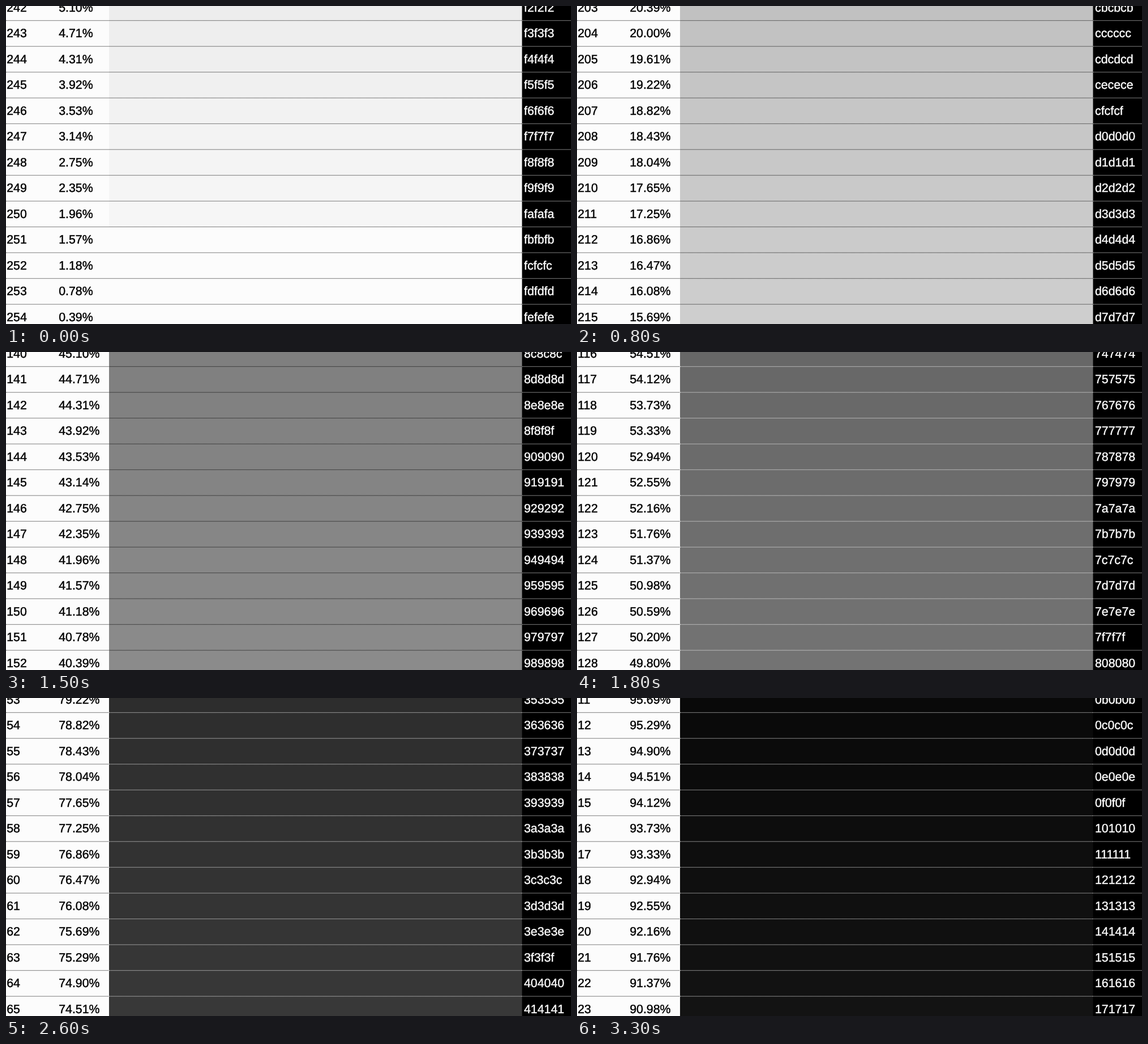
These frames come from a looping animation (998x561 px, 3.8 s). An HTML page:

```html
<!DOCTYPE html>
<html lang="en">
<head>
<meta charset="utf-8">
<title>Grey scale table</title>
<style>
  html, body { margin: 0; width: 100%; height: 100%; overflow: hidden; background: #fcfcfc; }
  svg { display: block; width: 998px; height: 561px; }
  text {
    font: 21.3px "Liberation Sans", Arial, Helvetica, sans-serif;
    text-rendering: geometricPrecision;
    white-space: pre;
    stroke-width: 0.45;
  }
  line { stroke-width: 1; stroke-dasharray: 1 1; }
</style>
</head>
<body>
<svg id="stage" viewBox="0 0 998 561">
  <rect width="998" height="561" fill="#fcfcfc"/>
</svg>
<script>
const LOOP = 3800, STEP = 100;
const PITCH = 45.5, FIRST_LINE = -19.9, ROWS = 13;
const BAR_X = 182, CODE_X = 911.5, WIDTH = 998;
const PAPER = "#fcfcfc", INK = "#000";

// Rows scrolled on each step: speeds up, then slowly runs down.
const SCROLL = [
  2, 4, 5, 6, 7, 7, 8,
  9, 10, 9, 9,
  9, 9, 8, 8, 8, 8,
  8, 8, 8, 8,
  8, 8, 8, 7,
  7, 7, 7, 6, 6, 5, 4
];
const tops = [242];
SCROLL.forEach(n => tops.push(tops[tops.length - 1] - n));

const stage = document.getElementById("stage");

function add(tag, attrs) {
  const el = document.createElementNS("http://www.w3.org/2000/svg", tag);
  for (const key in attrs) el.setAttribute(key, attrs[key]);
  return stage.appendChild(el);
}

function rule(x1, x2, y, stroke) {
  return add("line", { x1, x2, y1: y, y2: y, stroke });
}

// Displayed tone of a grey value, slightly darker in the middle range.
function tone(v) {
  const c = v > 250 ? 252 : Math.round(v * 252 / 255 - 0.0007 * v * (255 - v));
  return `rgb(${c},${c},${c})`;
}

const rowTop = i => FIRST_LINE + i * PITCH;

const bars = [];
for (let i = 0; i < ROWS; i++) {
  bars.push(add("rect", {
    x: BAR_X, y: rowTop(i), width: CODE_X - BAR_X, height: PITCH + 0.5,
    "shape-rendering": "crispEdges"
  }));
}
add("rect", { x: CODE_X, y: 0, width: WIDTH - CODE_X, height: 561, fill: INK });

const rows = bars.map((bar, i) => {
  const y = rowTop(i);
  const label = (x, color) => add("text", { x, y: y + 29.5, fill: color, stroke: color });
  rule(0, BAR_X, y + 0.1, INK);
  rule(CODE_X, WIDTH, y + 0.1, PAPER);
  return {
    bar,
    edge: rule(BAR_X, CODE_X, y + 0.1, INK),
    index: label(1.2, INK),
    percent: label(93.2, INK),
    code: label(915, PAPER)
  };
});

function show(top) {
  rows.forEach((row, i) => {
    const v = top + i;
    row.bar.setAttribute("fill", tone(v));
    row.edge.setAttribute("stroke", v <= 128 ? PAPER : INK);
    row.index.textContent = v;
    row.percent.textContent = ((255 - v) / 255 * 100).toFixed(2) + "%";
    row.code.textContent = v.toString(16).padStart(2, "0").repeat(3);
  });
}

const start = performance.now();
let shown = -1;

function tick() {
  const t = (performance.now() - start) % LOOP;
  const step = Math.max(0, Math.min(SCROLL.length, Math.floor(t / STEP) - 1));
  if (step !== shown) show(tops[shown = step]);
  requestAnimationFrame(tick);
}
tick();
</script>
</body>
</html>
```
